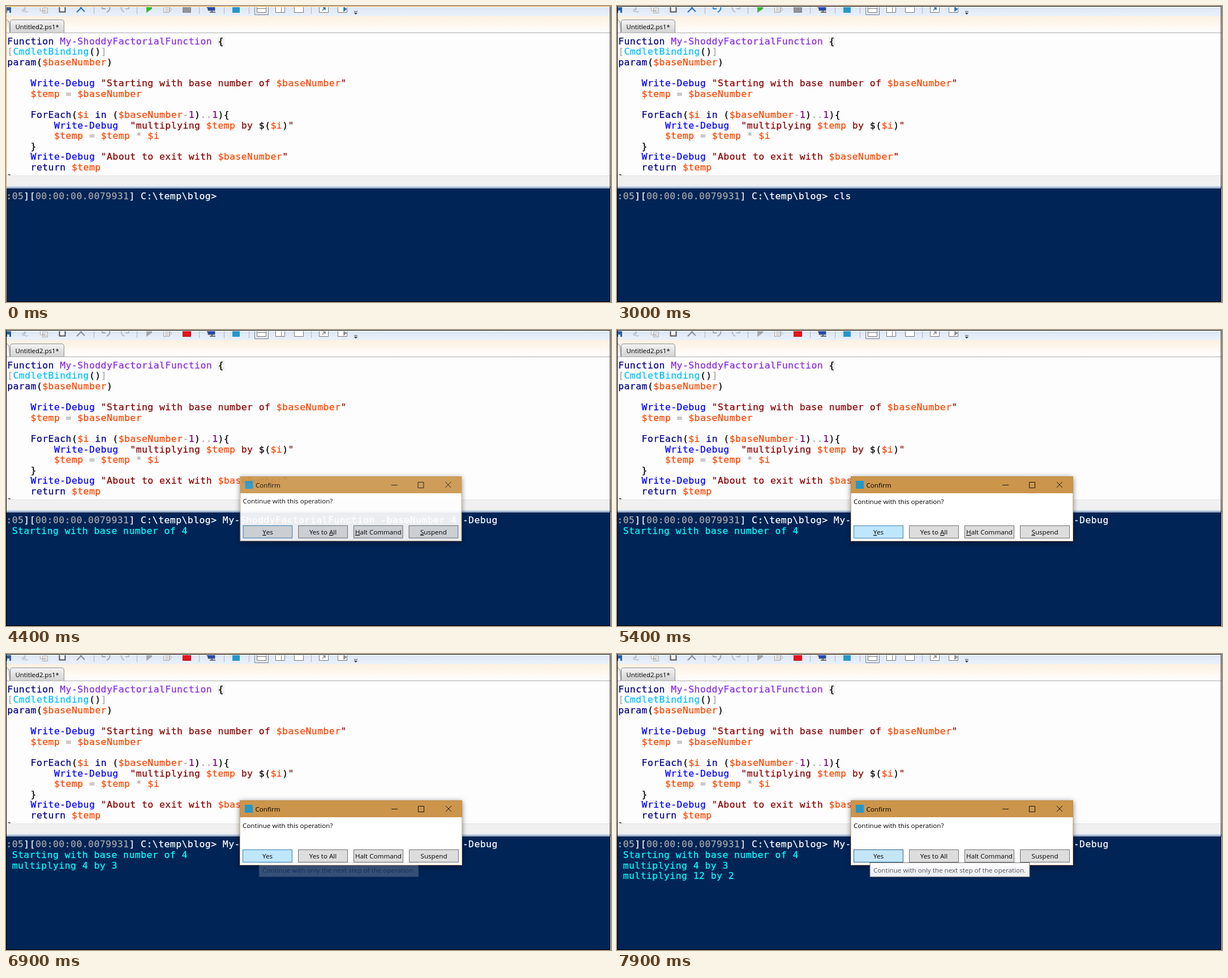
These frames come from a looping animation (1069 px wide and 524 px high, 8000 ms). An HTML page:

```html
<!DOCTYPE html>
<html lang="en">
<head>
<meta charset="utf-8">
<title>Script debugging</title>
<style>
html, body { margin: 0; width: 100%; height: 100%; overflow: hidden; background: #fff; }
svg { display: block; width: 100%; height: 100%; }
text { white-space: pre; }
.mono { font: 16.5px "DejaVu Sans Mono", monospace; letter-spacing: .405px; stroke-width: .25; }
.ui { font: 11.65px "Open Sans", sans-serif; }
.keys .key { text-decoration: underline; }
.shadow { filter: drop-shadow(0 2px 5px rgba(0, 0, 0, .5)); }
</style>
</head>
<body>
<svg id="stage" viewBox="0 0 1069 524" preserveAspectRatio="none">
  <defs>
    <linearGradient id="bar" x2="0" y2="1"><stop stop-color="#dce6f4"/><stop offset="1" stop-color="#eaf1fa"/></linearGradient>
    <linearGradient id="strip" x2="0" y2="1"><stop stop-color="#fdf0e1"/><stop offset="1" stop-color="#fff"/></linearGradient>
    <linearGradient id="tab" x2="0" y2="1"><stop stop-color="#f3f3f3"/><stop offset="1" stop-color="#d2d2d2"/></linearGradient>
    <linearGradient id="tip" x2="0" y2="1"><stop stop-color="#fff"/><stop offset="1" stop-color="#e9eaf2"/></linearGradient>
    <clipPath id="pane"><path d="M0 48H1069V299.500H0z"/></clipPath>
  </defs>

  <rect width="1069" height="19" fill="url(#bar)"/>
  <rect y="18" width="1069" height="30" fill="url(#strip)"/>
  <g id="tools" fill="none" stroke="#a5a8ad"></g>
  <rect y="1" width="1069" height="1" fill="#fff"/>

  <path d="M0 24Q6 25 6.500 33V47" fill="#e4e4e4" stroke="#8e8f8f"/>
  <path d="M7.500 47.500V29Q7.500 24.500 12 24.500H98Q102.500 24.500 102.500 29V47.500" fill="url(#tab)" stroke="#8e8f8f"/>
  <text class="ui" x="16.500" y="41" style="font-size:11.400px">Untitled2.ps1*</text>
  <rect y="47" width="1069" height="1" fill="#a9abad"/>

  <rect y="48" width="1069" height="252" fill="#fdfdfd"/>
  <rect x="374" y="54" width="12" height="18" fill="#f0f0f0"/>
  <g id="code" class="mono" clip-path="url(#pane)"></g>
  <rect y="300" width="1069" height="18" fill="#f0f0f0"/>
  <rect y="300" width="1069" height="1" fill="#e2e2e2"/>
  <rect y="318" width="1069" height="2" fill="#e4ecf6"/>
  <rect y="320" width="1069" height="3" fill="#a3b5cc"/>
  <rect y="323" width="1068" height="201" fill="#012456"/>
  <g id="shell" class="mono"></g>
  <rect id="caret" y="329" width="1.200" height="18" fill="#fff"/>
  <path d="M1067.500 0V523.500H0" fill="none" stroke="#000"/>
  <path id="edge" d="M.5 524V.5H1068" fill="none"/>

  <g id="dialog">
    <rect class="shadow" x="413" y="259" width="393" height="115" fill="#fff"/>
    <rect x="413" y="259" width="393" height="30" fill="#cb954c"/>
    <rect x="413.500" y="259.500" width="392" height="114" fill="none" stroke="#b98a4b" stroke-opacity=".6"/>
    <rect x="422" y="267" width="14" height="14" fill="#2597c9"/>
    <path d="M681 274.500H692M728.500 269.500h10v10h-10zM777 269l10 10M787 269l-10 10" fill="none" stroke="#151515"/>
    <text class="ui" x="440.500" y="279">Confirm</text>
    <text class="ui" x="418" y="307.500">Continue with this operation?</text>
    <g id="buttons" class="ui" text-anchor="middle"></g>
  </g>
  <g id="tooltip">
    <rect x="444.500" y="368.500" width="282" height="25" fill="url(#tip)" stroke="#767676"/>
    <text class="ui" x="450.500" y="386" fill="#575757">Continue with only the next step of the operation.</text>
  </g>
</svg>
<script>
const $ = id => document.getElementById(id);
const NS = 'http://www.w3.org/2000/svg';
const LOOP = 8000, PITCH = 18.62, ADVANCE = 10.338;

function add(parent, tag, attrs = {}, text = '') {
  const node = document.createElementNS(NS, tag);
  for (const k in attrs) node.setAttribute(k, attrs[k]);
  node.textContent = text;
  return parent.appendChild(node);
}

// The first letter of each run picks its colour.
const ink = {
  k: '#00008b', f: '#8a2be2', b: '#000', o: '#a9a9a9', t: '#00bfff',
  v: '#ff4500', c: '#0000ff', s: '#8b0000', n: '#800080', w: '#fff', d: '#00ffff'
};
function line(parent, x, y, ...runs) {
  const text = add(parent, 'text', { x, y });
  for (const run of runs) {
    const color = ink[run[0]];
    add(text, 'tspan', { fill: color, stroke: color }, run.slice(1));
  }
  return text;
}

[
  ['kFunction ', 'fMy-ShoddyFactorialFunction ', 'b{'],
  ['o[', 'tCmdletBinding', 'b()', 'o]'],
  ['kparam', 'b(', 'v$baseNumber', 'b)'],
  [],
  ['c    Write-Debug ', 's"Starting with base number of ', 'v$baseNumber', 's"'],
  ['v    $temp ', 'o= ', 'v$baseNumber'],
  [],
  ['k    ForEach', 'b(', 'v$i ', 'kin ', 'b(', 'v$baseNumber', 'o-', 'n1', 'b)', 'o..', 'n1', 'b){'],
  ['c        Write-Debug  ', 's"multiplying ', 'v$temp ', 'sby ', 'b$(', 'v$i', 'b)', 's"'],
  ['v        $temp ', 'o= ', 'v$temp ', 'o* ', 'v$i'],
  ['b    }'],
  ['c    Write-Debug ', 's"About to exit with ', 'v$baseNumber', 's"'],
  ['k    return ', 'v$temp'],
  ['b}']
].forEach((runs, i) => line($('code'), 2.2, 67.6 + i * PITCH, ...runs));

const shellY = i => 342.3 + i * PITCH;
const prompt = line($('shell'), .3, shellY(0),
  'o:05', 'w][', 'o00:00:00.0079931', 'w] C:\\temp\\blog> ', 'w');
const typed = prompt.lastChild;
const output = [
  [4100, 'Starting with base number of 4'],
  [6500, 'multiplying 4 by 3'],
  [7400, 'multiplying 12 by 2']
].map(([at, s], i) => ({ at, node: line($('shell'), .3, shellY(i + 1), 'd ' + s) }));

const buttons = [['', 'Y', 'es'], ['Yes to ', 'A', 'll'], ['', 'H', 'alt Command'], ['', 'S', 'uspend']]
  .map(([pre, key, post], i) => {
    const x = 418.5 + i * 98;
    const box = add($('buttons'), 'rect', { x, y: 346.5, width: 87, height: 22, fill: '#ddd', stroke: '#707070' });
    const label = add($('buttons'), 'text', { x: x + 43.5, y: 362 });
    add(label, 'tspan', {}, pre);
    add(label, 'tspan', { class: 'key' }, key);
    add(label, 'tspan', {}, post);
    return box;
  });

const icon = (d, attrs) => add($('tools'), 'path', { d, ...attrs });
const paneIcon = (x, extra = '') =>
  icon(`M${x - 7.5} 0V11.500h16V0${extra}`, { stroke: '#74777c', fill: '#fff' });

for (const x of [155, 231, 341, 385, 429, 539]) icon(`M${x}.500 0V14`, { stroke: '#aeb4be' });
icon('M0 2H9V12H0z', { fill: '#2a5f9e', stroke: 'none' });
icon('M2 8h4v4h-4z', { fill: '#dfe9f5', stroke: 'none' });
icon('M32 0l3 7M36 0l-5 7M29 8a2 2 0 1 0 4 0a2 2 0 1 0 -4 0M34 9a2 2 0 1 0 4 0');
icon('M60.500 0V8.500h8M64.500 3.500h9v9h-9zM66 7h6M66 10h6', { fill: '#f4f4f4' });
icon('M94.500 0V10.500h10V0', { stroke: '#4d5057', 'stroke-width': 2, fill: '#f4f4f4' });
const clear = icon('M125 11l9-9M131 2l8 8', { 'stroke-width': 2.2 });
const undo = icon('M170 5h6M170 5V0M178 11q7-4 5-11', { 'stroke-width': 2.2 });
icon('M217 5h-6M217 5V0M209 11q-7-4-5-11', { 'stroke-width': 2, stroke: '#b8bbc0' });
const run = icon('M248 0V12L258 5V0z', { stroke: 'none' });
icon('M278.500 0V11.500h10V0M281 3h6M281 6h6M281 9h6M289 2l4 4l-4 4z', { fill: '#eee' });
const stop = icon('M312.500 0V11.500H326.500V0z');
icon('M357 0h12v8h-12z', { fill: '#2449b8', stroke: '#55585e' });
icon('M360 11h10M364 8v3M355 2l4 4', { stroke: '#44474d', 'stroke-width': 1.6 });
icon('M400 0h13v12h-13z', { fill: '#2597c9', stroke: 'none' });
icon('M439.500 0V15.500H463.500V0', { fill: '#e6eaf0', stroke: '#7c818a' });
paneIcon(451, 'M443 4.500h17');
paneIcon(484, 'M486.500 0v11');
paneIcon(517);
paneIcon(561);
paneIcon(594);
const arrows = icon('M559 8l5-5M560 3h4v4M597 2l4 3.500l-4 3.500z', { 'stroke-width': 1.6 });
icon('M615 9.500h6M615.500 12h5l-2.500 3z', { fill: '#555', stroke: '#555' });

const within = (t, a, b) => t >= a && t < b;
const show = (node, on) => node.setAttribute('visibility', on ? 'visible' : 'hidden');
const fill = (node, color) => node.setAttribute('fill', color);
const stroke = (node, color) => node.setAttribute('stroke', color);

function dialogAlpha(t) {
  if (within(t, 6500, 6600) || within(t, 7300, 7400)) return .4;
  const opened = [7400, 6500, 4100].find(at => t >= at);
  if (opened === undefined) return 0;
  return [0, .24, .65, .92][(t - opened) / 100] ?? 1;
}

function tooltipAlpha(t) {
  const spans = [[5800, 6400, .4], [6900, 7200, .22], [7800, LOOP, .22]];
  for (const [from, click, start] of spans) {
    if (within(t, from, from + 100)) return start;
    if (within(t, from, click)) return 1;
    if (within(t, click, click + 100)) return .8;
  }
  return 0;
}

function caretOn(t) {
  return within(t, 700, 1200) || within(t, 1700, 2200) ||
    within(t, 2600, 3000) || within(t, 3200, 3600);
}

function draw(ms) {
  const t = Math.floor(ms / 100) * 100;
  const running = t >= 4100;

  stroke($('edge'), t < 700 ? '#dc9a3c' : '#000');

  const command = t < 2600 ? '' : t < 2700 ? 'cl' : t < 3200 ? 'cls'
    : 'My-ShoddyFactorialFunction -baseNumber 4 -Debug';
  typed.textContent = command;
  $('caret').setAttribute('x', 383 + command.length * ADVANCE - (command ? 1.2 : 0));
  show($('caret'), caretOn(t));
  for (const { at, node } of output) show(node, t >= at);

  const accent = running ? '#8d9096' : '#2d6fb5';
  stroke(undo, within(t, 2600, 4100) ? '#2e86cf' : '#a5a8ad');
  stroke(clear, accent);
  stroke(arrows, accent);
  fill(arrows, accent);
  fill(run, running ? '#a5a8ad' : '#35b835');
  fill(stop, running ? '#e8121c' : '#909399');
  stroke(stop, running ? '#b50f16' : '#85888e');

  const alpha = dialogAlpha(t), scale = 1 - .045 * (1 - alpha);
  const shift = 1 - alpha;
  $('dialog').setAttribute('opacity', alpha);
  $('dialog').setAttribute('transform',
    `translate(${609.5 - shift} ${316.5 - shift}) scale(${scale}) translate(-609.5 -316.5)`);
  $('dialog').setAttribute('class', t < 6400 ? 'keys' : '');

  const pressed = within(t, 6400, 6600) || within(t, 7200, 7400) || t >= 7900;
  fill(buttons[0], t < 5400 ? '#ddd' : pressed ? '#c4e5f6' : '#bee6fd');
  stroke(buttons[0], pressed ? '#2c628b' : '#3c7fb1');
  const overHalt = within(t, 5000, 5100);
  fill(buttons[2], overHalt ? '#bee6fd' : '#ddd');
  stroke(buttons[2], overHalt ? '#3c7fb1' : '#707070');

  $('tooltip').setAttribute('opacity', tooltipAlpha(t));
  $('tooltip').setAttribute('transform', t < 6500 ? '' : 'translate(2.5 1)');
}

const start = performance.now();
function tick() {
  draw((performance.now() - start) % LOOP);
  requestAnimationFrame(tick);
}
tick();
</script>
</body>
</html>
```
